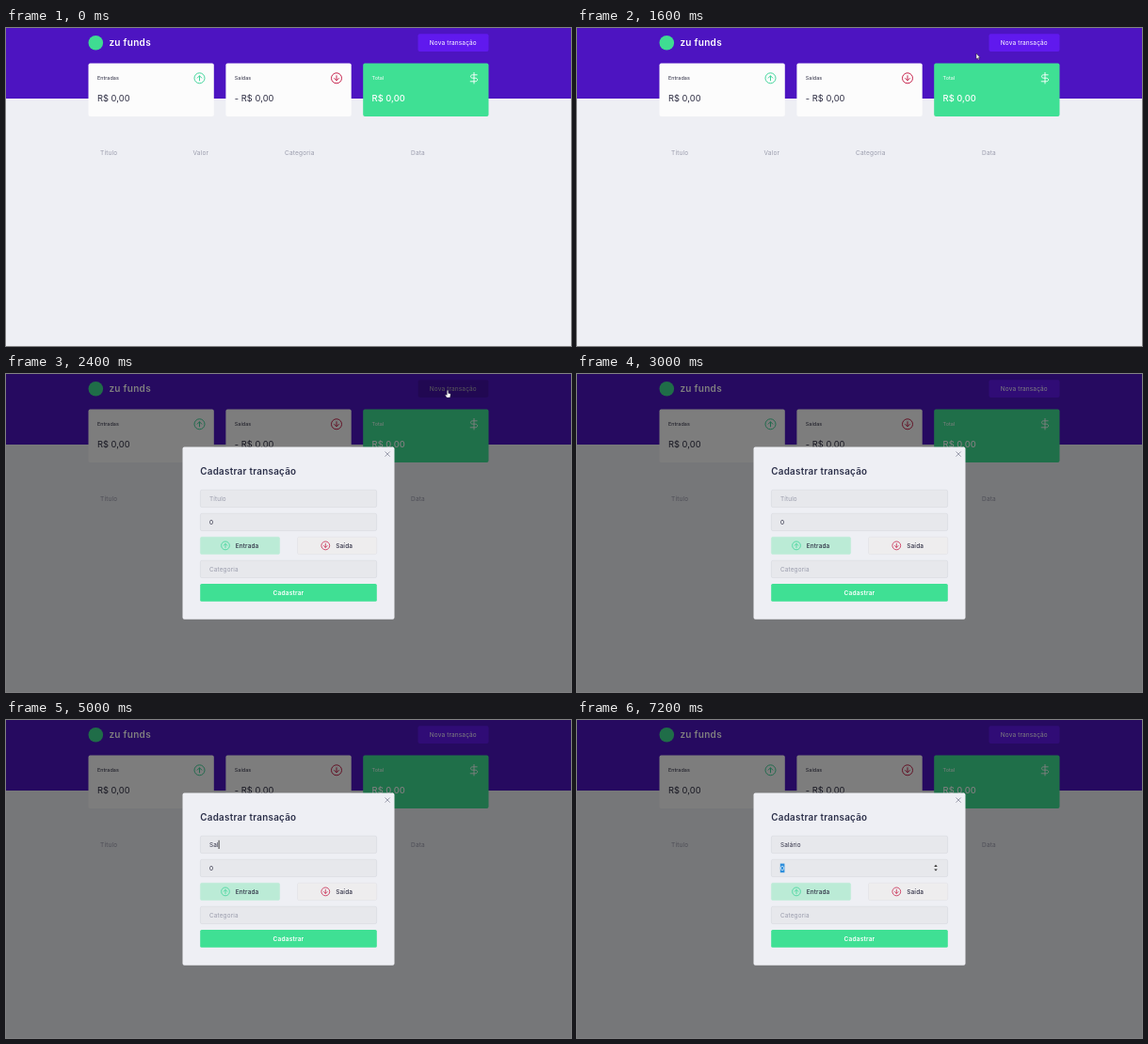
Animation, 600 px wide and 338 px high, one loop 8 s. Source, as an HTML page:

```html
<!DOCTYPE html>
<html lang="pt-BR">
<head>
<meta charset="utf-8">
<style>
  html, body { margin: 0; width: 100%; height: 100%; overflow: hidden; background: #eeeff4; }
  svg { display: block; width: 100vw; height: 100vh; }
  text { font-family: Inter, "Open Sans", sans-serif; white-space: pre; }
</style>
</head>
<body>
<svg id="stage" viewBox="0 0 600 338"></svg>
<script>
const NS = 'http://www.w3.org/2000/svg';
const stage = document.getElementById('stage');

const GREEN = '#3fe094', RED = '#c8264f', INK = '#2b2b40', MUTED = '#9a9cac';

function add(parent, tag, attrs, content) {
  const node = document.createElementNS(NS, tag);
  for (const key in attrs) node.setAttribute(key, attrs[key]);
  if (content !== undefined) node.textContent = content;
  parent.appendChild(node);
  return node;
}

const group = parent => add(parent, 'g', {});

function box(parent, x, y, width, height, fill, rx = 0, extra = {}) {
  return add(parent, 'rect', { x, y, width, height, fill, rx, ...extra });
}

function label(parent, x, y, content, size, fill, weight = 400, spacing = 0.15, anchor = 'start') {
  return add(parent, 'text', {
    x, y, fill, 'font-size': size, 'font-weight': weight,
    'letter-spacing': spacing, 'text-anchor': anchor
  }, content);
}

function line(parent, d, stroke, width) {
  return add(parent, 'path', {
    d, stroke, 'stroke-width': width, fill: 'none',
    'stroke-linecap': 'round', 'stroke-linejoin': 'round'
  });
}

function arrowIcon(parent, x, y, r, color, up) {
  const g = add(parent, 'g', { transform: `translate(${x} ${y}) scale(${r / 5.5} ${(up ? 1 : -1) * r / 5.5})` });
  add(g, 'circle', { r: 5.5, fill: 'none', stroke: color, 'stroke-width': 1 });
  line(g, 'M0 2.6V-2.4M-2.3 -0.2L0 -2.5L2.3 -0.2', color, 1);
}

function show(node, on) {
  node.setAttribute('visibility', on ? 'visible' : 'hidden');
}

// Page
const page = group(stage);
box(page, 0, 0, 600, 338, '#eeeff4');
box(page, 0, 0, 600, 75, '#4d14c1');
add(page, 'circle', { cx: 95.3, cy: 15.8, r: 7.8, fill: '#3fdc92' });
label(page, 109.4, 19.2, 'zu funds', 10, '#fff', 600, 0.3);

box(page, 437.5, 6.3, 75, 18.7, '#6019ee', 2);
label(page, 449.7, 18, 'Nova transação', 6.5, '#fff', 400, 0.14);
const shade = box(page, 437.5, 6.3, 75, 18.7, '#000', 2);

function card(x, title, amount, fill, ink, weight) {
  box(page, x, 37.6, 133.3, 56.4, fill, 2);
  label(page, x + 9.4, 55.2, title, 5.4, ink, 400, 0.06);
  label(page, x + 9.4, 78.3, amount, 9.3, ink, weight, 0.05);
}
card(87.5, 'Entradas', 'R$ 0,00', '#fcfcfc', INK, 400);
card(233.4, 'Saídas', '- R$ 0,00', '#fcfcfc', INK, 400);
card(379.2, 'Total', 'R$ 0,00', GREEN, '#fff', 500);
arrowIcon(page, 205.5, 53.3, 5.5, '#41d59b', true);
arrowIcon(page, 351, 53.3, 5.5, RED, false);
line(page, 'M497 47.4V59M500.2 49.8H495.6C492.7 49.8 492.7 53.2 495.6 53.2H498.3C501.4 53.2 501.4 56.8 498.3 56.8H493.2', '#fff', 0.9);

[[100, 'Título'], [198.5, 'Valor'], [296, 'Categoria'], [430, 'Data']]
  .forEach(([x, name]) => label(page, x, 135.3, name, 6.5, MUTED, 400, 0.2));

// Dialog
const dialog = group(stage);
box(dialog, 0, 0, 600, 338, '#000', 0, { opacity: 0.5 });
box(dialog, 187.5, 77.5, 225, 183.2, '#eeeff4', 2);
line(dialog, 'M402.8 82.8L407.4 87.4M407.4 82.8L402.8 87.4', '#85879a', 0.8);
label(dialog, 206.2, 106.6, 'Cadastrar transação', 9.8, '#2b2f49', 600, 0.3);

function field(x, y, width, fill, border) {
  box(dialog, x + 0.2, y + 0.2, width - 0.4, 18.4, fill, 1.6, { stroke: border, 'stroke-width': 0.5 });
}
[123, 148, 198].forEach(y => field(206.2, y, 187.6, '#e7e8ec', '#d3d4da'));
field(206.2, 173, 84.6, '#bbebd6', '#bbebd6');
field(309.3, 173, 84.6, '#eeedee', '#dfdfe2');
box(dialog, 206.2, 223, 187.6, 18.8, GREEN, 1.6);

arrowIcon(dialog, 233, 182.4, 4.4, '#41d59b', true);
label(dialog, 243.8, 184.8, 'Entrada', 6.4, INK, 500, 0.15);
arrowIcon(dialog, 339.3, 182.4, 4.4, RED, false);
label(dialog, 350.2, 184.8, 'Saída', 6.4, INK, 500, 0.2);
label(dialog, 300, 234.8, 'Cadastrar', 6.5, '#fff', 600, 0.2, 'middle');

const hint = label(dialog, 216, 134.8, 'Título', 6.4, MUTED);
const typed = label(dialog, 216, 134.8, '', 6.4, INK);
const caret = box(dialog, 216, 127.8, 0.8, 9.2, '#111');
const selection = box(dialog, 215.8, 152.6, 4.6, 9.6, '#2f8fdc');
const amount = label(dialog, 216, 159.8, '0', 6.4, INK);
label(dialog, 216, 209.8, 'Categoria', 6.4, MUTED);
const spinner = add(dialog, 'path', {
  d: 'M379.2 156L381 153.8L382.8 156ZM379.2 158.4L381 160.6L382.8 158.4Z', fill: '#333'
});

// Pointers
const outline = { fill: '#fff', stroke: '#222', 'stroke-width': 0.5, 'stroke-linejoin': 'round' };
const arrow = add(stage, 'path', { d: 'M0 0V6.1L1.3 4.9L2.2 6.9L3.1 6.5L2.3 4.6H4Z', ...outline });
const hand = add(stage, 'path', {
  d: 'M-0.7 0.4Q0 -0.5 0.7 0.4V3L2.7 3.5Q3.2 3.7 3.1 4.6L2.5 7.6H-0.9L-2.6 5Q-2.4 4 -0.7 5Z',
  ...outline, 'stroke-width': 0.3
});

const LOOP = 8000;
const moves = [
  [1000, 55.3, 143.2], [1200, 190, 62], [1400, 330, 46], [1600, 424, 27],
  [1800, 463, 18], [2000, 469, 17.4], [2600, 388, 92], [2800, 262, 130]
];
const keys = [
  [0, ''], [4400, 'S'], [4600, 'Sa'], [5000, 'Sal'],
  [5200, 'Salá'], [5400, 'Salári'], [5600, 'Salário']
];

const latest = (steps, t) => steps.filter(step => step[0] <= t).pop();

function draw(t) {
  const hovering = t >= 1800 && t < 2600;
  shade.setAttribute('opacity', !hovering ? 0 : t < 2000 ? 0.15 : 0.3);

  const move = t < 3000 ? latest(moves, t) : null;
  show(arrow, move && !hovering);
  show(hand, move && hovering);
  if (move) {
    const place = `translate(${move[1]} ${move[2]})`;
    arrow.setAttribute('transform', place);
    hand.setAttribute('transform', place);
  }

  dialog.setAttribute('display', t >= 2400 ? 'inline' : 'none');
  if (t < 2400) return;

  const word = latest(keys, t)[1];
  if (typed.textContent !== word) typed.textContent = word;
  show(hint, !word);
  caret.setAttribute('x', 216 + (word ? typed.getComputedTextLength() : 0));
  show(caret, (t >= 3200 && t < 3600) || (t >= 4200 && t < 6000));

  const selected = t >= 6000;
  show(selection, selected);
  show(spinner, selected);
  amount.setAttribute('fill', selected ? '#fff' : INK);
}

const start = performance.now();
function tick() {
  draw((performance.now() - start) % LOOP);
  requestAnimationFrame(tick);
}
tick();
</script>
</body>
</html>
```
